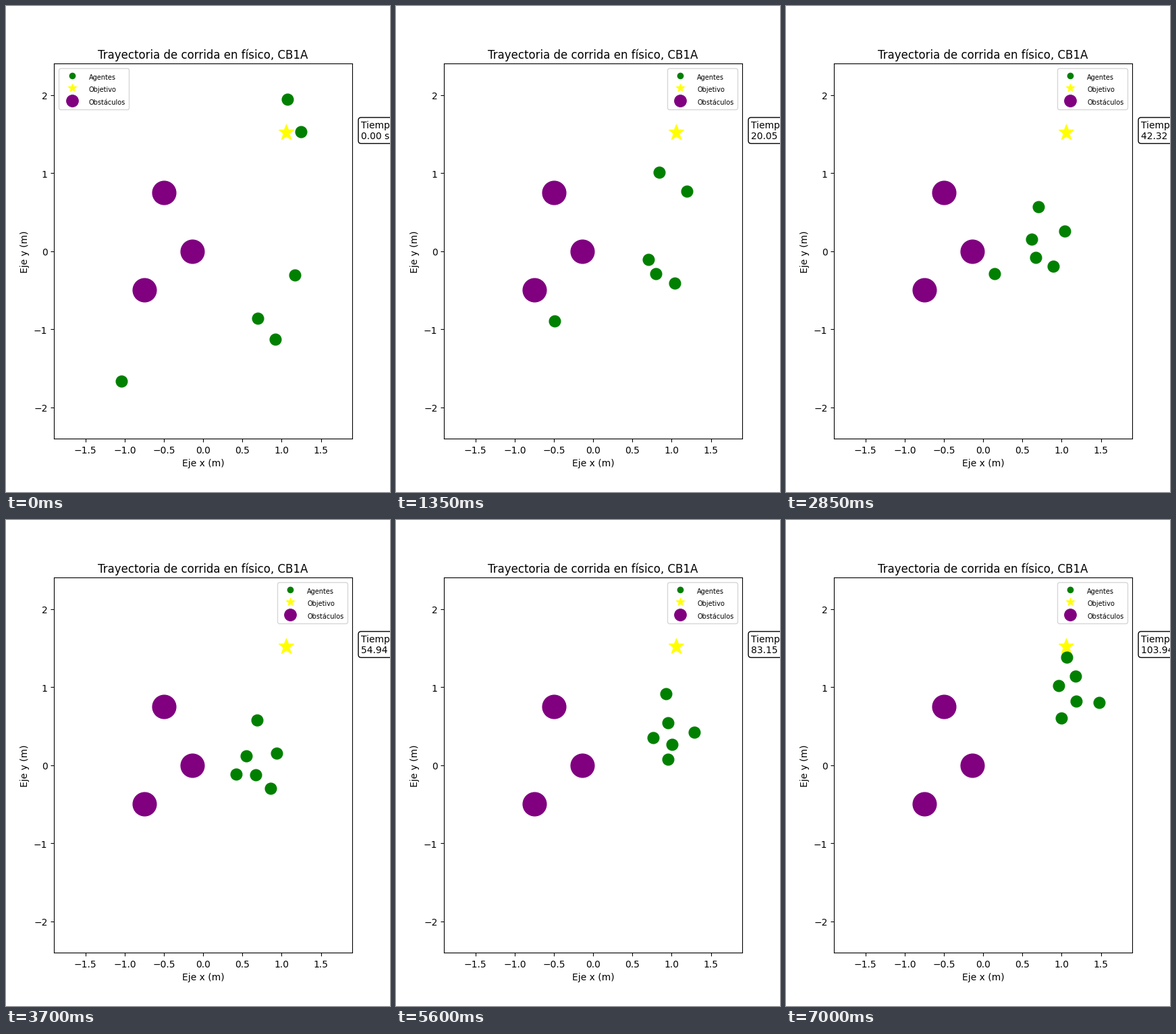
Write a matplotlib script that moves like this. It is 569 by 719 pixels and loops after 7.05 s.

```python
import numpy as np
import matplotlib.pyplot as plt
from matplotlib.animation import FuncAnimation
from matplotlib.text import Text
from matplotlib.transforms import ScaledTranslation

W, H, DPI = 569, 719, 100
FRAMES, STEP_MS = 141, 50
SECONDS_PER_FRAME = 0.74243

# The run has three legs: approach, gather, climb to the goal.
LEG_ENDS = [0, 40, 74, 140]
LEG_POWERS = [(1, 1), (0.8, 0.8), (0.8, 1.6)]  # easing in x and y

# Per agent: position at each leg end (m) and sideways bow of the approach.
AGENTS = [
    ([(1.07, 1.945), (0.73, 0.56), (0.69, 0.58), (1.065, 1.38)], 0),
    ([(1.25, 1.53), (1.17, 0.395), (0.94, 0.15), (1.48, 0.80)], 0),
    ([(1.17, -0.31), (0.72, 0.195), (0.55, 0.12), (1.18, 1.14)], -0.25),
    ([(0.695, -0.86), (0.66, -0.02), (0.67, -0.125), (1.185, 0.82)], 0.145),
    ([(0.92, -1.13), (0.945, -0.055), (0.86, -0.30), (1.0, 0.60)], 0.12),
    ([(-1.04, -1.665), (-0.225, -0.52), (0.42, -0.115), (0.96, 1.02)], 0),
]


def position(n, stops, bow):
    leg = min(np.searchsorted(LEG_ENDS, n, side="right"), 3) - 1
    u = (n - LEG_ENDS[leg]) / (LEG_ENDS[leg + 1] - LEG_ENDS[leg])
    a, b = np.array(stops[leg]), np.array(stops[leg + 1])
    p = a + (b - a) * u ** np.array(LEG_POWERS[leg])
    if leg == 0:
        dx, dy = (b - a) / np.hypot(*(b - a))
        p = p + bow * np.sin(np.pi * u) * np.array([dy, -dx])
    return p


fig = plt.figure(figsize=(W / DPI, H / DPI), dpi=DPI, facecolor="white")
ax = fig.add_axes([71.25 / W, 79.2 / H, 441.75 / W, 554.4 / H])
ax.set(xlim=(-1.9, 1.9), ylim=(-2.4, 2.4),
       xticks=np.arange(-1.5, 1.6, 0.5), yticks=range(-2, 3),
       xlabel="Eje x (m)", ylabel="Eje y (m)",
       title="Trayectoria de corrida en físico, CB1A")


def dots(x, y, marker, color, size, label, zorder=2):
    return ax.plot(x, y, marker, color=color, markersize=size,
                   label=label, zorder=zorder)[0]


agents = dots([], [], "o", "green", 12, "Agentes", zorder=3)
goal = dots([1.06], [1.52], "*", "yellow", 17, "Objetivo")
obstacles = dots([-0.5, -0.14, -0.75], [0.75, 0, -0.5], "o", "purple", 25,
                 "Obstáculos")

# The legend moves aside while an agent is underneath it.
legend = ax.legend(handles=[agents, goal, obstacles], loc="best",
                   markerscale=0.5)
for label in legend.get_texts():
    label.set_fontsize(7)

# An invisible copy of the clock carries its box.
box = ax.text(1.03, 0.8, "Tiempo:\n100.00 s", color="none",
              transform=ax.transAxes,
              bbox=dict(boxstyle="round", facecolor="white", edgecolor="black"))
clock = ax.text(1.03, 0.8, "", transform=ax.transAxes)


def update(n):
    agents.set_data(*np.transpose([position(n, *a) for a in AGENTS]))
    clock.set_text(f"Tiempo:\n{n * SECONDS_PER_FRAME:.2f} s")
    return agents, clock


# Lettering sits one pixel low; the x label already follows its tick labels.
update(0)
fig.canvas.draw()
drop = ScaledTranslation(0, -1 / DPI, fig.dpi_scale_trans)
for text in fig.findobj(Text):
    if text not in (box, ax.xaxis.label):
        text.set_transform(text.get_transform() + drop)

anim = FuncAnimation(fig, update, frames=FRAMES, interval=STEP_MS,
                     repeat=True, repeat_delay=0, blit=False)
plt.show()
```
